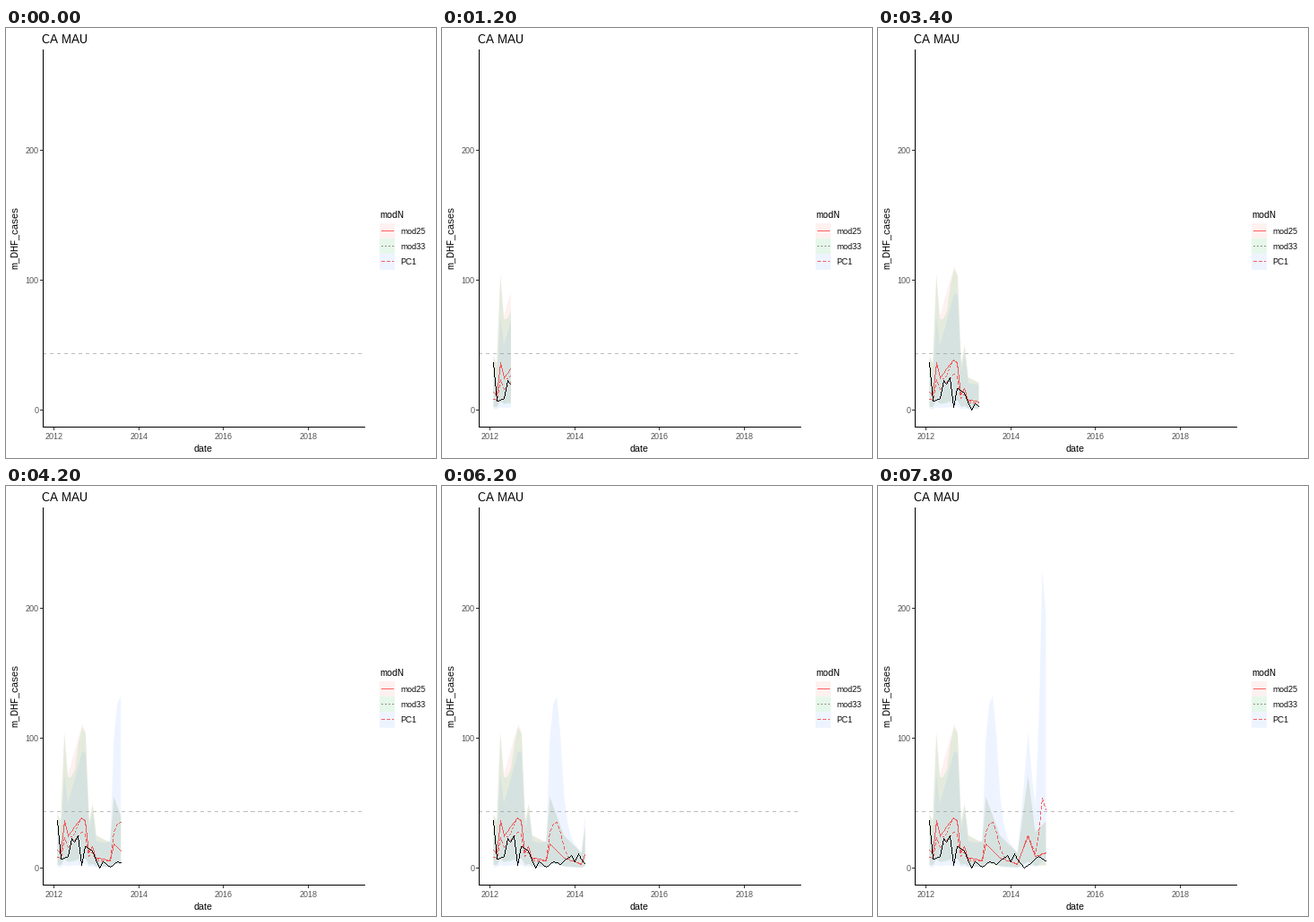
Recreate the animation shown at these times as a matplotlib script. Size 480x480 px, loop 8 s.

```python
import itertools

import numpy as np
import matplotlib.pyplot as plt
from matplotlib.animation import FuncAnimation
from matplotlib.colors import to_rgba
from matplotlib.patches import Polygon, Rectangle

plt.rcParams.update({"font.family": "Liberation Sans",
                     "text.hinting": "native", "text.hinting_factor": 1})

SIZE, DPI = 480, 80
PX = 72 / DPI                      # one pixel in points
LEFT, RIGHT, TOP, BOTTOM = 41, 400, 24, 445
FRAMES, INTERVAL = 40, 200
STEPS = 99                         # steps from the first to the last date
RED = to_rgba("red", 0.6)
SOLID, DOTTED, DASHED = (1, 0), (2, 2), (4, 2)

FIRST = np.datetime64("2012-02-01")
SPAN = (np.datetime64("2019-01-01") - FIRST).astype(int)
months = np.arange("2012-02", "2014-12", dtype="datetime64[M]")
days = (months.astype("datetime64[D]") - FIRST).astype(int)
key = np.round(days * STEPS / SPAN)    # step at which each month is reached
k = np.arange(len(months))


def day_x(d):
    return 57.4 + d * 327.3 / SPAN


def val_y(v):
    return 426.7 - 1.45 * v


def turns(points):
    """Monthly series that runs straight between its turning points."""
    return np.interp(k, list(points), list(points.values()))


def bump(center, width):
    return np.exp(-((k - center) / width) ** 2)


# The models are all scaled from one seasonal curve.
cases = turns({0: 37, 1: 7, 3: 9, 4: 23, 5: 20, 6: 25, 7: 2, 8: 17, 10: 13,
               12: 0, 13: 5, 15: 0.5, 17: 5, 19: 3, 22: 10, 23: 5, 24: 11,
               27: 0, 31: 9, 33: 5.5})
mid25 = turns({0: 14, 1: 12, 2: 37, 3: 25, 7: 39, 8: 37, 9: 12, 10: 17, 11: 8,
               15: 6, 16: 19, 20: 8, 25: 3, 28: 25, 30: 9, 33: 12})
mid33 = mid25 * (0.98 - 0.18 * bump(4.6, 1))
mid_pc = mid25 * (0.6 + 0.015 * k + 1.8 * bump(18.3, 2.2)
                  + 3.9 * bump(32.2, 1.3))

# name, fill, key line colour, dash, middle, lower, upper
MODELS = [
    ("mod25", "#F8766D", RED, SOLID, mid25, mid25 * 0.2, mid25 * 2.75 + 3.5),
    ("mod33", "#00BA38", to_rgba("#9A9080"), DOTTED,
     mid33, mid33 * 0.2, mid33 * 2.75 + 3.5),
    ("PC1", "#619CFF", RED, DASHED,
     mid_pc, mid_pc * 0.1, mid_pc * (3 + 0.04 * k)),
]

fig = plt.figure(figsize=(SIZE / DPI, SIZE / DPI), dpi=DPI, facecolor="white")
ax = fig.add_axes([0, 0, 1, 1])
ax.axis("off")


def blank():
    return np.zeros((SIZE, SIZE, 4))


def layer(img, z):
    return ax.imshow(img, extent=(0, SIZE, SIZE, 0), aspect="auto",
                     interpolation="nearest", vmin=0, vmax=1, zorder=z)


def stroke(img, xs, ys, color, dash=SOLID):
    """Draw a one pixel wide hard-edged polyline."""
    pts = np.floor(np.column_stack([xs, ys])).astype(int)
    run = 0
    for a, b in itertools.pairwise(pts):
        t = np.linspace(0, 1, np.abs(b - a).max() + 1)
        length = np.hypot(*(b - a))
        lit = (run + t * length) % sum(dash) < dash[0]
        px, py = np.rint(a + np.outer(t, b - a)).astype(int)[lit].T
        img[py, px] = color
        run += length


def text(x, y, s, size, color="black", **kw):
    ax.text(x, y, s, fontsize=size * PX, color=color, va="baseline", **kw)


def draw_axes(img):
    stroke(img, [LEFT, RIGHT], [363, 363], to_rgba("#BEBEBE"), (4, 4))
    tick = to_rgba("#333333")
    for v in (0, 100, 200):
        y = val_y(v)
        stroke(img, [LEFT - 3, LEFT], [y, y], tick)
        text(36.3, y + 3.4, str(v), 9, "#4D4D4D", ha="right")
    for year in (2012, 2014, 2016, 2018):
        x = day_x((np.datetime64(f"{year}-01-01") - FIRST).astype(int))
        stroke(img, [x, x], [BOTTOM, BOTTOM + 3], tick)
        text(x, 458.6, str(year), 9, "#4D4D4D", ha="center")
    stroke(img, [LEFT, LEFT, RIGHT], [TOP, BOTTOM, BOTTOM], to_rgba("black"))
    text(40.5, 17, "CA MAU", 13)
    text(220.5, 472.6, "date", 11, ha="center")
    ax.text(15, 234, "m_DHF_cases", fontsize=11 * PX, rotation=90,
            ha="right", va="center")


def draw_legend(img):
    text(417.4, 212, "modN", 11)
    for i, (name, fill, color, dash, *_) in enumerate(MODELS):
        y, end = (round(217.9 + 17.28 * n) for n in (i, i + 1))
        ax.add_patch(Rectangle((417, y), 17, end - y, fc=fill, alpha=0.1, lw=0))
        stroke(img, [419, 432], [y + 8, y + 8], color, dash)
        text(440.6, y + 12, name, 9)


base = blank()
draw_axes(base)
draw_legend(base)
layer(base, 1)
ribbons = [ax.add_patch(Polygon(np.zeros((3, 2)), fc=fill, alpha=0.1, lw=0,
                                zorder=2))
           for _, fill, *_ in MODELS]
lines = layer(blank(), 3)
ax.set_xlim(0, SIZE)
ax.set_ylim(SIZE, 0)


def reveal(series, frame):
    """Months already reached plus the moving tip."""
    return np.append(series[key < frame], np.interp(frame, key, series))


def update(frame):
    x = day_x(reveal(days, frame))
    img = blank()
    for (*_, dash, mid, low, high), ribbon in zip(MODELS, ribbons):
        up = np.column_stack([x, val_y(reveal(high, frame))])
        down = np.column_stack([x, val_y(reveal(low, frame))])
        ribbon.set_xy(np.vstack([up, down[::-1]]))
        ribbon.set_visible(frame > 0)
        stroke(img, x, val_y(reveal(mid, frame)), RED, dash)
    stroke(img, x, val_y(reveal(cases, frame)), to_rgba("black"))
    lines.set_data(img)
    return ribbons + [lines]


anim = FuncAnimation(fig, update, frames=FRAMES, interval=INTERVAL,
                     init_func=lambda: update(0), repeat=True, repeat_delay=0)
plt.show()
```
